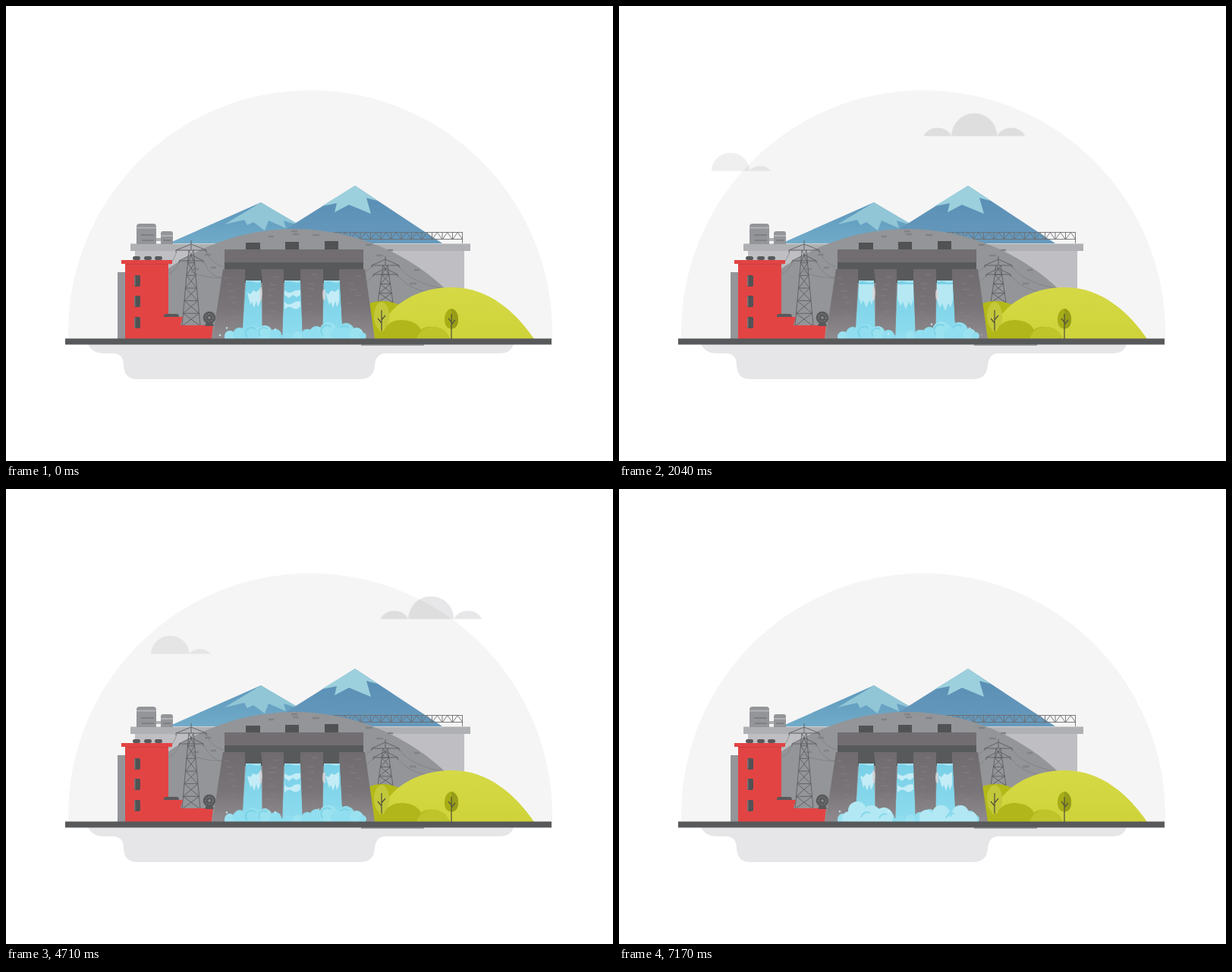
These frames come from a looping animation (800x600 px, 7200 ms). An HTML page:

```html
<!DOCTYPE html>
<html lang="en">
<head>
<meta charset="utf-8">
<title>Hydroelectric dam</title>
<style>
html, body { margin: 0; width: 100%; height: 100%; overflow: hidden; background: #fff; }
svg { display: block; width: 800px; height: 600px; }
.cloud { fill: #e7e7e9; mix-blend-mode: multiply; animation: 7200ms linear infinite; }
#bigCloud { animation-name: bigDrift, bigFade; }
#smallCloud { fill: #efeff0; animation-name: smallDrift, smallFade; }
@keyframes bigDrift { from { transform: translateX(331px); } to { transform: translateX(579px); } }
@keyframes smallDrift { from { transform: translateX(69px); } to { transform: translateX(256px); } }
@keyframes bigFade { 0%, 4% { opacity: 0; } 10%, 80% { opacity: 1; } 92%, 100% { opacity: 0; } }
@keyframes smallFade { 0%, 10.4% { opacity: 0; } 12.8%, 80% { opacity: 1; } 92%, 100% { opacity: 0; } }
.calm { animation: calm 7200ms step-end infinite; }
.rush { animation: rush 7200ms step-end infinite; }
@keyframes calm { 0% { opacity: 1; } 6% { opacity: 0; } 62% { opacity: 1; } }
@keyframes rush { 0% { opacity: 0; } 6% { opacity: 1; } 62% { opacity: 0; } }
.ripple { animation: ripple 600ms ease-in-out infinite alternate; }
@keyframes ripple { from { transform: translateY(-1px); } to { transform: translateY(2px); } }
.puff { transform-box: fill-box; transform-origin: 50% 100%; animation: bob 1200ms ease-in-out infinite; }
@keyframes bob { 0%, 100% { transform: scale(1); } 50% { transform: scale(.95, .9); } }
#surge { transform-origin: 330px 439px; animation: surge 7200ms linear infinite; }
@keyframes surge {
  0%, 94% { transform: scaleY(.3); opacity: 0; }
  97%, 100% { transform: scaleY(1); opacity: 1; }
}
.drop { fill: #c9f1f8; animation: hop 1200ms linear infinite; }
@keyframes hop {
  0% { transform: translateY(0); opacity: .9; }
  30% { transform: translateY(-8px); opacity: .9; }
  60%, 100% { transform: translateY(4px); opacity: 0; }
}
</style>
</head>
<body>
<svg viewBox="0 0 800 600">
  <defs>
    <linearGradient id="leftPeak" x1="0" y1="0" x2="0" y2="1">
      <stop offset="0" stop-color="#5d97bb"/><stop offset="1" stop-color="#71abc9"/>
    </linearGradient>
    <linearGradient id="rightPeak" x1="0" y1="0" x2="0" y2="1">
      <stop offset="0" stop-color="#588db4"/><stop offset="1" stop-color="#6699bc"/>
    </linearGradient>
    <linearGradient id="stone" x1="0" y1="0" x2="0" y2="1">
      <stop offset="0" stop-color="#6f6b6e"/><stop offset=".55" stop-color="#787477"/><stop offset="1" stop-color="#8f8b8e"/>
    </linearGradient>
    <linearGradient id="grass" x1="0" y1="0" x2="0" y2="1">
      <stop offset="0" stop-color="#d5d945"/><stop offset="1" stop-color="#cfd33a"/>
    </linearGradient>
    <linearGradient id="water" x1="0" y1="0" x2="0" y2="1">
      <stop offset="0" stop-color="#78d0e7"/><stop offset="1" stop-color="#8edcee"/>
    </linearGradient>
    <clipPath id="arch"><path d="M214 280H604V439H214Z"/></clipPath>
    <clipPath id="aboveGround"><path d="M0 0H800V439H0Z"/></clipPath>
  </defs>

  <path fill="#f5f5f5" d="M82 439V430A319 319 0 0 1 720 430V439Z"/>
  <path fill="#e6e6e8" d="M108 446Q114 458 128 458H142Q155 459 155 474Q156 492 173 492H466Q485 492 486 474Q487 458 501 458H653Q666 457 669 446Z"/>

  <path fill="url(#leftPeak)" d="M214 313L336 259L425 313Z"/>
  <path fill="#91c6d7" d="M336 259L288 288L314 282L318 289L326 285L341 296L346 283L369 293L366 283L391 291Z"/>
  <path fill="url(#rightPeak)" d="M339 313L460 237L575 313Z"/>
  <path fill="#9dd0dd" d="M460 237L416 264L436 260L433 272L452 262L481 274L475 253L490 257Z"/>

  <path id="truss" fill="none" stroke="#6f6f71" stroke-width=".9"/>
  <path fill="#bfbfc3" d="M170 322H604V439H170Z"/>
  <path fill="#afb0b3" d="M164 313.500H612V323H164Z"/>
  <g clip-path="url(#arch)">
    <circle cx="380" cy="584" r="290" fill="#939598"/>
    <path stroke="#808285" stroke-width="2.5" d="M376 297H384M378 301H386M404 302H413M346 304H353M474 315H482M488 329H497M503 322H510M532 366H541M538 348H545M262 328H270M246 347H254M270 345H277"/>
  </g>

  <g fill="#939598">
    <path d="M172 314V291Q172 287 176 287H194Q198 287 198 291V314Z"/>
    <path d="M204 314V300Q204 297 207 297H217Q220 297 220 300V314Z"/>
    <path d="M198 306H204V310H198Z" fill="#afb0b3"/>
    <path d="M172 292.5H198M204 303H220" stroke="#b9babd" stroke-width="1.5"/>
    <path d="M178 302H195M179 309H195M207 309H217" stroke="#7e7f82" stroke-width="2"/>
  </g>

  <path fill="none" stroke="#77787a" stroke-width=".6" d="M264 323Q270 341 290 345M261 338Q268 357 290 361M243 350Q262 360 288 358M225 324Q220 337 215 342M228 338Q223 350 215 353M518 343Q531 364 578 373M516 355Q530 374 560 378M483 343L472 352M485 355L474 365"/>
  <g id="pylons" fill="none" stroke="#5c5d60" stroke-width=".9"></g>

  <path fill="#939598" d="M147 351H158V439H147Z"/>
  <path fill="#e24444" d="M152 335H219V340H214V410H233L230 421H273L271 439H157V340H152Z"/>
  <path stroke="#c93d3f" d="M157 340.500H214"/>
  <g fill="#58595b">
    <rect x="167" y="330" width="10" height="5" rx="2.5"/>
    <rect x="182" y="330" width="10" height="5" rx="2.5"/>
    <rect x="196" y="330" width="10" height="5" rx="2.5"/>
    <path d="M208 410V407.500Q209 406 212 406H225Q228 406 228 410Z"/>
    <path d="M266 412H270L274 422H262Z"/>
    <circle cx="268" cy="411" r="8.300"/>
    <circle cx="268" cy="411" r="5" fill="none" stroke="#8b8c8f" stroke-dasharray="2 1.500"/>
    <circle cx="268" cy="411" r="1.800" fill="#8b8c8f"/>
  </g>
  <g id="windows" fill="#515254"></g>

  <path fill="#b3b918" d="M470 396Q497 382 522 396L540 439H470Z"/>
  <path fill="url(#grass)" d="M488 439C500 394 542 371 588 371C636 371 672 404 696 439Z"/>
  <ellipse cx="495" cy="409" rx="10" ry="18.500" fill="#c3c83a"/>
  <path fill="#b1b71a" d="M486 439Q486 427 498 428Q504 414 522 414Q541 415 547 427Q553 422 563 423Q579 424 585 439Z"/>
  <path fill="#bec42a" d="M541 439Q546 423 563 423Q579 424 585 439Z"/>
  <path fill="#a7ad16" d="M587 399C576 401 576 420 582 424Q587 427 592 424C598 420 598 401 587 399Z"/>
  <path fill="#979d18" d="M587 399C598 401 598 420 592 424L587 426Z"/>
  <path fill="none" stroke="#55533c" stroke-width="1.300" d="M495 401V428M495 418L490 412M495 414L500 408M587 406V439M587 417L583 412M587 420L592 414"/>

  <path fill="#515254" d="M316 312H335V321H316ZM368 311H386V321H368ZM420 310H438V321H420Z"/>
  <path fill="#58595b" d="M288 338H471V365H288Z"/>
  <path fill="#716d70" d="M288 321H471V338H288Z"/>
  <path fill="url(#stone)" d="M286 347H315V362L311 439H272ZM336 347H366V362L364 439H338V362ZM388 347H418V362L417 439H391L388 362ZM439 347H473L486 439H444L439 362Z"/>
  <path id="stones" stroke="#8b878a" stroke-width="2" opacity=".35"/>
  <g id="streams"></g>
  <g clip-path="url(#aboveGround)">
    <g id="foam"></g>
    <g id="surge" fill="#b2e8f4">
      <circle cx="314" cy="424" r="12"/><circle cx="333" cy="428" r="11"/><circle cx="349" cy="432" r="12"/>
      <circle cx="303" cy="434" r="9"/><path d="M295 439V430H360V439Z"/>
      <circle cx="405" cy="432" r="9"/><circle cx="424" cy="428" r="11"/><circle cx="450" cy="428" r="11"/>
      <circle cx="464" cy="434" r="8"/><path d="M396 439V432H472V439Z"/>
      <path fill="none" stroke="#85d7ea" stroke-width="2" d="M319 433Q322 424 331 427M343 434Q346 427 353 429M431 434Q434 426 442 428"/>
    </g>
    <g id="drops"></g>
  </g>

  <path fill="#58595b" d="M78 438.500H719V446.500H78Z"/>
  <path stroke="#58595b" d="M468 447H551"/>

  <path id="bigCloud" class="cloud" d="M0 171.500A21 21 0 0 1 37 171.500ZM37 171.500A30 30 0 0 1 97 171.500ZM97 171.500A21 21 0 0 1 134 171.500Z"/>
  <path id="smallCloud" class="cloud" d="M0 217.500A25 24 0 0 1 50 217.500ZM50 217.500A18 18 0 0 1 78 217.500Z"/>
</svg>
<script>
const byId = id => document.getElementById(id);
const add = (id, markup) => byId(id).insertAdjacentHTML('beforeend', markup);

// Railing along the crest
let truss = 'M432 298.500H602M432 307.500H602M601.500 298V313';
for (let x = 440; x < 600; x += 13.5) {
  const end = Math.min(x + 13.5, 602);
  truss += `M${x} 298V308L${(x + end) / 2} 298.500L${end} 308`;
}
byId('truss').setAttribute('d', truss);

function pylon(x, top, base, foot, arms, panels) {
  const neck = arms[0][0];
  const half = y => 3 + (foot - 3) * (y - neck) / (base - neck);
  let d = `M${x} ${top}V${neck}M${x - 3} ${neck}L${x - foot} ${base}M${x + 3} ${neck}L${x + foot} ${base}`;
  for (let i = 0; i < panels; i++) {
    const y = neck + (base - neck) * i / panels;
    const next = neck + (base - neck) * (i + 1) / panels;
    const a = half(y), b = half(next);
    d += `M${x - a} ${y}L${x + b} ${next}H${x - b}L${x + a} ${y}`;
  }
  for (const [y, reach] of arms)
    d += `M${x - reach} ${y}L${x} ${y - 8}L${x + reach} ${y}ZM${x - reach} ${y}v3M${x + reach} ${y}v3`;
  add('pylons', `<path d="${d}"/>`);
}
pylon(244, 309, 422, 12, [[322, 20], [336, 16]], 6);
pylon(500, 330, 391, 10, [[342, 18], [354, 16]], 4);

for (const y of [355, 382, 410])
  add('windows', `<rect x="169" y="${y}" width="8" height="15" rx="2"/><path fill="#77787a" d="M169 ${y + 1}h1.500v13h-1.500z"/>`);

let seed = 7;
const random = () => (seed = seed * 16807 % 2147483647) / 2147483647;
let stones = '';
for (const x of [288, 341, 393, 449])
  for (let i = 0; i < 8; i++)
    stones += `M${x + random() * 12} ${354 + i * 9 + random() * 5}h${4 + random() * 6}`;
byId('stones').setAttribute('d', stones);

// Each stream: left and right edge at the gate, then at the foot
[[316, 336, 311, 338], [367, 388, 364, 391], [419, 440, 417, 444]].forEach(([l, r, fl, fr], i) => {
  const w = r - l;
  const ragged = (y, drop) => `M${l} 366H${r}V${y}l-3 ${drop}l-3 -${drop * .6}l-4 ${drop}l-4 -${drop}l-3 ${drop * .6}L${l} ${y}Z`;
  const band = `M${l} 390q${w / 4} 6 ${w / 2} 2t${w / 2} -2v6q-${w / 4} 6 -${w / 2} 2t-${w / 2} 2Z`;
  const calm = i === 1
    ? `<path d="M${l} 375q${w / 4} 5 ${w / 2} 2t${w / 2} -2v6l-5 3l-5 -3l-5 4l-6 -4Z"/><path d="${band}"/>`
    : `<path d="M${l + 2} 378l4 2l4 -5l4 2l${w - 15} -4v17l-3 7l-2 -8l-3 9l-3 -8l-2 4Z"/>`;
  add('streams', `<clipPath id="fall${i}"><path d="M${l} 362H${r}L${fr} 439H${fl}Z"/></clipPath>
    <g clip-path="url(#fall${i})">
      <path fill="url(#water)" d="M${l} 362H${r}L${fr} 439H${fl}Z"/>
      <path fill="#a6e2ef" d="M${l} 361H${r}v3q-5 2 -10 0t-${w - 10} 0Z"/>
      <g class="calm" fill="#c3ecf6">${calm}</g>
      <g class="rush"><path class="ripple" fill="#b5e8f3" d="${ragged(383 + i * 2, 10)}"/></g>
    </g>`);
});
add('streams', '<path fill="#dcd9db" opacity=".8" d="M336 370q3 7 1 14q1 5 -3 4v-15ZM418 374q-2 6 0 13l3 1v-14Z"/>');

// Foam: centre x, centre y, radius
const puffs = [
  [295, 435, 7], [308, 432, 9], [325, 430, 12], [341, 430, 10], [355, 434, 8],
  [371, 436, 6], [384, 435, 7], [397, 433, 8], [409, 431, 9], [425, 428, 12],
  [448, 428, 12], [437, 432, 9], [462, 433, 9], [470, 435, 5]
];
add('foam', '<path fill="#8bdbed" d="M288 439V434H474V439Z"/>');
puffs.forEach(([x, y, r], i) => add('foam',
  `<g class="puff" style="animation-delay:${-(i * 5 % 4) * 300}ms">
    <circle cx="${x}" cy="${y}" r="${r}" fill="${i % 3 ? '#90deef' : '#9be2f1'}"/>
    ${r > 9 ? `<path fill="none" stroke="#72cde3" stroke-width="1.500" d="M${x - r * .6} ${y + r * .5}A${r * .65} ${r * .65} 0 0 1 ${x + r * .3} ${y - r * .5}"/>` : ''}
  </g>`));

[[282, 434], [291, 429], [355, 433], [412, 425], [462, 430], [478, 432]].forEach(([x, y], i) => add('drops',
  `<circle class="drop" cx="${x}" cy="${y}" r="1.300" style="animation-delay:${-i * 200}ms"/>`));
</script>
</body>
</html>
```
